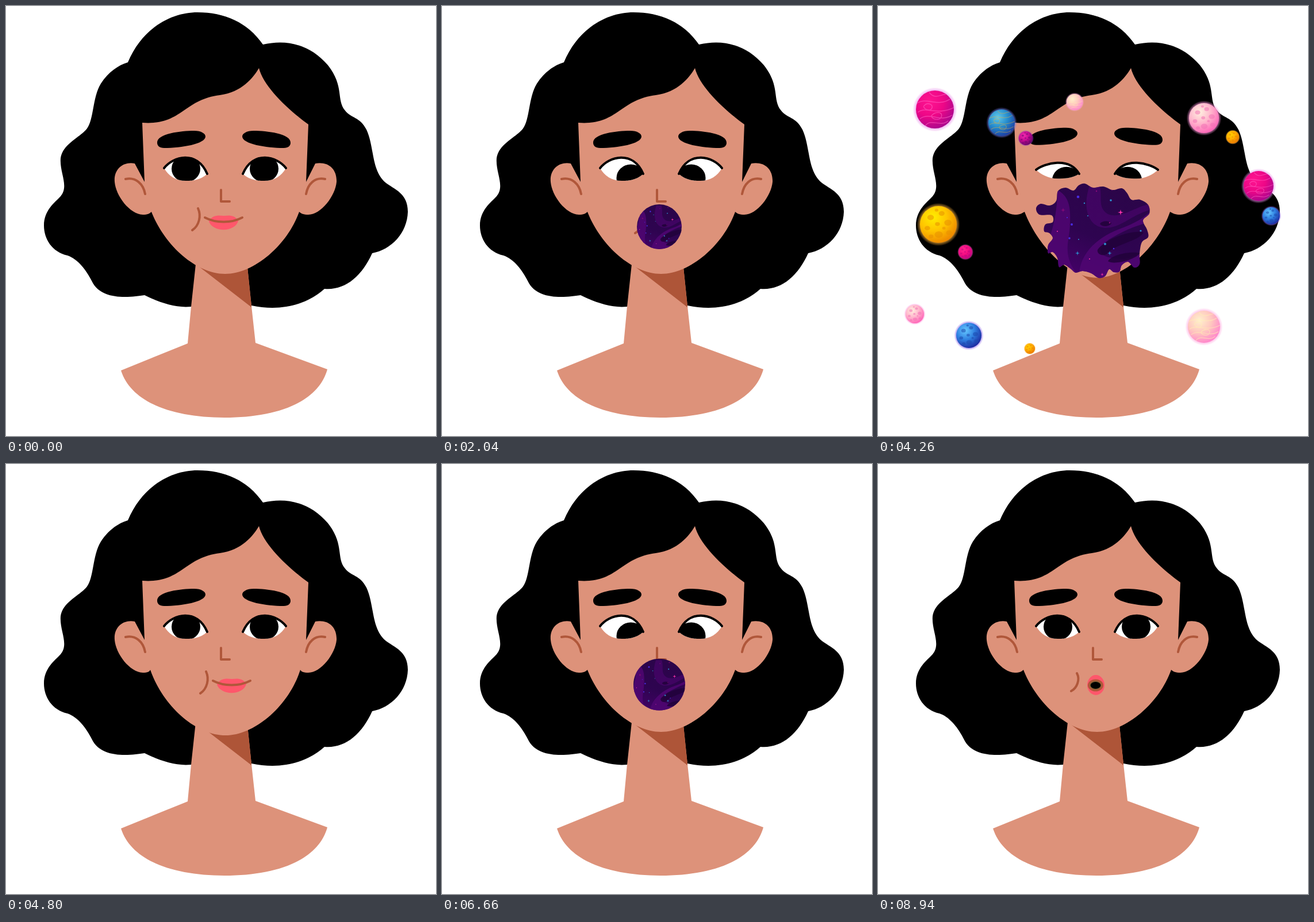
Recreate the animation shown at these times as an HTML page. Size 748 by 748 pixels, loop 9 s.

```html
<!DOCTYPE html>
<html lang="en">
<head>
<meta charset="utf-8">
<title>Cosmic bubble gum</title>
<style>
  html, body { margin: 0; width: 100%; height: 100%; overflow: hidden; background: #fff; }
  svg { display: block; width: 100vw; height: 100vh; }
  .skin { fill: #dd927a; }
  .line { fill: none; stroke: #b0573a; stroke-width: 4; stroke-linecap: round; stroke-linejoin: round; }
  .lash { fill: none; stroke: #000; stroke-width: 4; stroke-linecap: round; }
  .lip { fill: #ff576b; }
</style>
</head>
<body>
<svg viewBox="0 0 748 748">
  <defs>
    <linearGradient id="space" x1=".75" y1="0" x2=".3" y2="1">
      <stop offset="0" stop-color="#2a0547"/>
      <stop offset=".55" stop-color="#2e0450"/>
      <stop offset="1" stop-color="#4c0070"/>
    </linearGradient>
    <clipPath id="unit"><circle r="1"/></clipPath>
    <clipPath id="gumClip"><path id="gumEdge"/></clipPath>
    <clipPath id="eyeClip"><path id="eyeEdge"/></clipPath>
  </defs>

  <path d="M212 98C238 36 290 11 333 11C380 11 420 28 447 67C490 57 530 68 560 103C589 140 574 163 590 182C601 196 615 192 627 215C641 245 635 285 660 307C675 319 699 325 699 358C698 395 670 424 637 430C619 470 590 495 554 492C520 522 475 531 427 521L322 523C295 526 265 515 241 503C215 507 165 513 149 478C140 460 125 440 107 434C80 428 66 405 66 382C66 355 85 342 95 331C110 313 93 290 95 265C98 240 130 228 141 213C153 197 150 160 165 135C178 115 195 103 212 98Z"/>
  <path class="skin" d="M331 440L322 523L316 587L200 634C218 690 290 716 380 716C470 716 543 690 559 632L434 586L427 522L418.5 440Z"/>
  <path fill="#ae5538" d="M325 445L419 445L427 522V524Z"/>
  <path class="skin" id="face"/>
  <path class="line" d="M208 301C226 297 239 310 242 327M555 301C537 297 525 310 522 327"/>

  <g id="brows">
    <path id="brow" d="M263 238C262 222 305 217 327 217C340 217 347 222 347 227C347 240 305 247 275 247C267 247 263 243 263 238Z"/>
    <use href="#brow" transform="translate(758) scale(-1 1)"/>
  </g>
  <g id="eye">
    <g clip-path="url(#eyeClip)">
      <rect x="265" y="250" width="95" height="65" fill="#fff"/>
      <ellipse id="pupil" rx="25" ry="23.5"/>
    </g>
    <path class="lash" id="lash"/>
  </g>
  <use href="#eye" transform="translate(762) scale(-1 1)"/>

  <path class="line" d="M374 320V340H389"/>
  <path class="line" id="cheek"/>
  <g id="lips">
    <path class="lip" d="M353 375C358 363 370 364 379 365C388 364 398 363 404 374C398 394 360 394 353 375Z"/>
    <path class="line" d="M346 368C365 378 392 378 411 368"/>
  </g>
  <g id="pout">
    <ellipse class="lip" cx="379" cy="384.5" rx="15" ry="17.5"/>
    <ellipse cx="378.5" cy="385" rx="13.5" ry="10.5" fill="#b0573a"/>
    <ellipse cx="378.5" cy="385" rx="10" ry="7.2" fill="#766333"/>
    <ellipse cx="378.5" cy="385" rx="8.8" ry="6"/>
  </g>

  <g id="gum"><g clip-path="url(#gumClip)">
    <rect x="255" y="290" width="235" height="200" fill="url(#space)"/>
    <g fill="#500773" opacity=".85">
      <path d="M312 320C330 330 336 345 334 380C333 410 320 430 345 465L285 445C300 400 312 370 312 320Z"/>
      <path d="M350 478C346 430 385 400 425 386C455 375 470 362 482 350L482 374C450 380 425 392 402 406C380 422 378 440 430 440C450 436 465 425 478 415L468 478Z"/>
      <path opacity=".65" d="M368 312C355 350 365 385 395 386C425 386 440 362 482 352L482 343C450 345 425 372 400 362C380 350 392 330 385 312Z"/>
    </g>
    <g fill="#21033a" opacity=".85">
      <path d="M382 424C396 404 445 388 462 394C452 410 412 414 400 430C392 437 380 432 382 424Z"/>
      <path d="M400 444C406 433 438 426 456 430C446 442 410 451 400 444Z"/>
      <path d="M386 379C390 373 402 373 406 378C402 384 390 385 386 379Z"/>
    </g>
    <g id="stars"></g>
  </g></g>
  <g id="planets"></g>
</svg>

<script>
const $ = id => document.getElementById(id);
const CX = 378, CY = 385, LOOP = 9000, CYCLE = 4500, STEP = 60;

function add(parent, tag, attrs) {
  const el = document.createElementNS('http://www.w3.org/2000/svg', tag);
  for (const k in attrs) el.setAttribute(k, attrs[k]);
  parent.appendChild(el);
  return el;
}

// Closed smooth curve through a flat list of x, y pairs
function smooth(flat) {
  const n = flat.length / 2;
  const p = i => { const k = (i + n) % n * 2; return [flat[k], flat[k + 1]]; };
  let d = 'M' + p(0);
  for (let i = 0; i < n; i++) {
    const [a, b, c, e] = [p(i - 1), p(i), p(i + 1), p(i + 2)];
    const h = [0, 1].map(j => b[j] + (c[j] - a[j]) / 6);
    const k = [0, 1].map(j => c[j] - (e[j] - b[j]) / 6);
    d += `C${h} ${k} ${c}`;
  }
  return d + 'Z';
}

const SPLAT = smooth([
  360,309, 374,316, 392,314, 408,320, 424,317, 433,325, 441,337, 456,337, 470,346,
  472,361, 461,373, 468,389, 470,402, 459,411, 455,431, 455,449, 446,455, 435,445,
  424,451, 420,462, 410,463, 402,458, 395,470, 384,473, 371,465, 356,461, 344,464,
  335,457, 324,450, 315,454, 312,438, 304,428, 296,430, 296,416, 304,404, 298,395,
  289,392, 291,380, 304,376, 302,364, 281,363, 275,352, 283,344, 299,347, 310,339,
  313,322, 326,316, 340,321, 349,312
]);
const disc = r => `M${CX - r} ${CY - 2}a${r} ${r} 0 1 0 ${2 * r} 0a${r} ${r} 0 1 0 ${-2 * r} 0Z`;

// Stars: x, y, size, colour
const PINK = '#ff2fae', CYAN = '#2c8fd0', BLUE = '#4a2be0', PLUM = '#8a0a78';
[[422,359,5,PINK], [347,430,4,CYAN], [403,430,4,CYAN], [322,355,4,PLUM],
 [407,319,3,PLUM], [390,467,3,PINK]].forEach(([x, y, s, fill]) => {
  const k = s * .2;
  add($('stars'), 'path', { fill, d: `M${x} ${y - s}L${x + k} ${y - k}L${x + s} ${y}L${x + k} ${y + k}L${x} ${y + s}L${x - k} ${y + k}L${x - s} ${y}L${x - k} ${y - k}Z` });
});
[[348,332,2.3,BLUE], [405,338,1.8,CYAN], [395,414,2,CYAN], [337,380,2,BLUE], [333,404,1.8,BLUE],
 [359,343,1.2,CYAN], [365,365,1,CYAN], [457,391,1.6,CYAN], [403,377,1.3,PLUM], [349,406,1,CYAN],
 [410,422,1.3,BLUE], [380,322,1.2,PLUM], [312,392,1,PINK], [329,368,1.1,BLUE], [368,440,1,PINK]
].forEach(([cx, cy, r, fill]) => add($('stars'), 'circle', { cx, cy, r, fill }));

// Planet kinds: light, mid, dark, glow, marks, pattern
const KINDS = {
  magenta: ['#ff1590', '#ee0787', '#a8078e', '#e98be8', '#ff62c3', 'swirl'],
  gold:    ['#62c8e8', '#258dce', '#1c3ca0', '#6b78ea', '#d9ae45', 'swirl'],
  plum:    ['#f32bb0', '#c50b92', '#640669', '#8f36b8', '#6d086e', 'crater'],
  cream:   ['#fff0cd', '#ffc7bf', '#ff83cc', '#ffa7de', '#fff0b2', 'swirl'],
  rose:    ['#fff0df', '#ffb5cc', '#ff62b7', '#ff96dc', '#f272b4', 'crater'],
  orange:  ['#ffd000', '#ffad00', '#e87500', '#ffb43c', '#e98200', 'crater'],
  sun:     ['#ffed00', '#ffc400', '#ed8500', '#ffb43c', '#e79000', 'crater'],
  blue:    ['#66c8ff', '#2f7fe0', '#1b279d', '#8a65e8', '#1c49ae', 'crater'],
  pink:    ['#ff278f', '#f70d82', '#bc087f', '#d94eae', '#bd0781', 'crater']
};
const CRATERS = [[-.42,-.38,.18], [.18,-.6,.16], [.52,-.1,.2], [-.05,-.02,.13], [-.6,.2,.15],
  [.02,.55,.22], [.58,.45,.16], [-.4,.65,.13], [.3,.2,.09], [-.1,-.78,.1]];
const SWIRLS = 'M-1 -.3C-.4 -.7 .1 -.1 .8 -.55M-.9 .15C-.5 -.2 .1 .35 1 -.1M-.8 .5C-.3 .1 .3 .7 .9 .3M-.5 .85C-.2 .45 .3 .95 .7 .6M-.2 .35C0 .1 .4 .1 .35 .35S-.1 .55 -.2 .35M-.6 -.15C-.45 -.4 -.1 -.3 -.15 -.1S-.5 .05 -.6 -.15M-.3 -.9C0 -.5 .3 -.8 .6 -.8';

const defs = document.querySelector('defs');
for (const name in KINDS) {
  const [light, mid, dark, glow] = KINDS[name];
  const body = add(defs, 'radialGradient', { id: name, cx: .36, cy: .3, r: .75 });
  [[0, light], [.5, mid], [1, dark]].forEach(([offset, c]) => add(body, 'stop', { offset, 'stop-color': c }));
  const halo = add(defs, 'radialGradient', { id: name + 'Halo' });
  [[.82, .75], [1, 0]].forEach(([offset, o]) => add(halo, 'stop', { offset, 'stop-color': glow, 'stop-opacity': o }));
}

[[99,180,33,'magenta'], [215,203,23,'gold'], [257,230,12,'plum'], [342,167,14,'cream'],
 [567,195,26,'rose'], [617,228,11,'orange'], [662,313,26,'magenta'], [684,365,15,'blue'],
 [105,380,32,'sun'], [152,428,12,'pink'], [64,536,16,'rose'], [158,573,22,'blue'],
 [264,596,9,'orange'], [567,558,28,'cream']].forEach(([x, y, r, name]) => {
  const [, , , , mark, pattern] = KINDS[name];
  const g = add($('planets'), 'g', { transform: `translate(${x} ${y}) scale(${r})` });
  add(g, 'circle', { r: 1.17, fill: `url(#${name}Halo)` });
  add(g, 'circle', { r: 1, fill: `url(#${name})` });
  const marks = add(g, 'g', { 'clip-path': 'url(#unit)', opacity: .55 });
  if (pattern === 'swirl') add(marks, 'path', { d: SWIRLS, fill: 'none', stroke: mark, 'stroke-width': .045 });
  else CRATERS.forEach(([cx, cy, s]) => add(marks, 'ellipse', { cx, cy, rx: s, ry: s * .8, fill: mark }));
});

// Linear value between [time, value] pairs
function at(t, keys) {
  if (t <= keys[0][0]) return keys[0][1];
  for (let i = 1; i < keys.length; i++) {
    const [t0, a] = keys[i - 1], [t1, b] = keys[i];
    if (t <= t1) return a + (b - a) * (t - t0) / (t1 - t0);
  }
  return keys[keys.length - 1][1];
}

const set = (id, k, v) => $(id).setAttribute(k, v);
const zoom = (sx, sy = sx, lift = 0) =>
  `translate(${CX} ${CY - lift}) scale(${sx} ${sy}) translate(${-CX} ${-CY})`;
const show = (id, on) => { $(id).style.display = on ? '' : 'none'; };

const POP = 2640;
const SPLAT_KEYS = [[2640, .72], [2760, .98], [2880, 1.196], [3000, 1.09], [3120, 1.04]];
const PLANET_KEYS = [[2640, .06], [2760, .17], [2880, .304], [2940, .74], [3000, 1.109], [3060, 1.08], [3120, 1.04]];

function draw(t) {
  const chew = t < 1200 ? (1 - Math.cos(t * Math.PI / 300)) / 2 : 0;
  const back = 1 - at(t, [[4200, 0], [4440, 1]]) ** 2.35;
  const shock = at(t, [[2580, 0], [2820, 1]]) * back;
  const look = at(t, [[1560, 0], [1920, 1]]) * back;
  const pout = at(t, [[1200, 0], [1320, 1]]);

  // Chewing widens the jaw, a startled mouth only lengthens the chin
  const w = 2 * chew - 2 * shock, side = 415 + 6 * chew, chin = 466 + 6 * chew + 7 * shock;
  set('face', 'd', `M237 203C306 208 308 163 372 155C410 150 430 125 440 108C448 140 490 180 526 206L522 306L538 274C560 270 576 283 575 306C573 330 548 363 526 363C518 363 513 361 ${510 + w} 358C${490 + w} ${side} 432 ${chin} ${381 + chew} ${chin}C330 ${chin} ${275 - w} ${side} ${253 - w} 358C250 361 246 363 238 363C215 362 191 330 189 306C187 283 205 270 224 274L241 306Z`);

  set('brows', 'transform', `translate(0 ${-5.5 * shock})`);
  const y0 = 282 + 3 * shock, lid = 12 * shock, low = 304 - 4 * shock;
  const top = `M275 ${y0}C290 ${262 + lid} 332 ${250 + lid} 350 292`;
  set('eyeEdge', 'd', `${top}C337 ${low} 322 ${low} 313 ${low}C295 ${low} 283 ${low - 8} 275 ${y0}Z`);
  set('lash', 'd', top);
  set('pupil', 'cx', 313 + 15.5 * look);
  set('pupil', 'cy', 283 + 16 * look + 5 * shock);

  const m = pout, dx = 14 * chew, dy = 9 * chew;
  set('cheek', 'd', `M${334 + 12 * m + dx} ${352 + 12 * m + dy}c6 ${13 - 2 * m} ${2 - 2 * m} ${30 - 4 * m} -10 ${38 - 7 * m}`);
  show('lips', m < .6);
  show('pout', m >= .6);
  set('lips', 'transform', `translate(${dx + 378.5 * m} ${dy + 8 * m}) scale(${1 - m} 1)`);

  const popped = t >= POP, r = 45 + .0505 * (t - 2160);
  const burst = popped ? at(t, SPLAT_KEYS) * back : r / 75;
  const sag = popped ? at(t, [[2880, 0], [3120, 1]]) : 1;
  show('gum', t >= 1380 && burst > .01);
  set('gumEdge', 'd', popped ? SPLAT : disc(75));
  set('gum', 'transform', zoom(burst, burst * (.974 + .026 * sag), 2.5 * (1 - sag)));

  const spread = at(t, PLANET_KEYS) * back;
  show('planets', popped && spread > .01);
  set('planets', 'transform', zoom(spread));
}

function tick() {
  const t = performance.now() % LOOP;
  draw(Math.floor(t / STEP) * STEP % CYCLE);
  requestAnimationFrame(tick);
}
tick();
</script>
</body>
</html>
```
